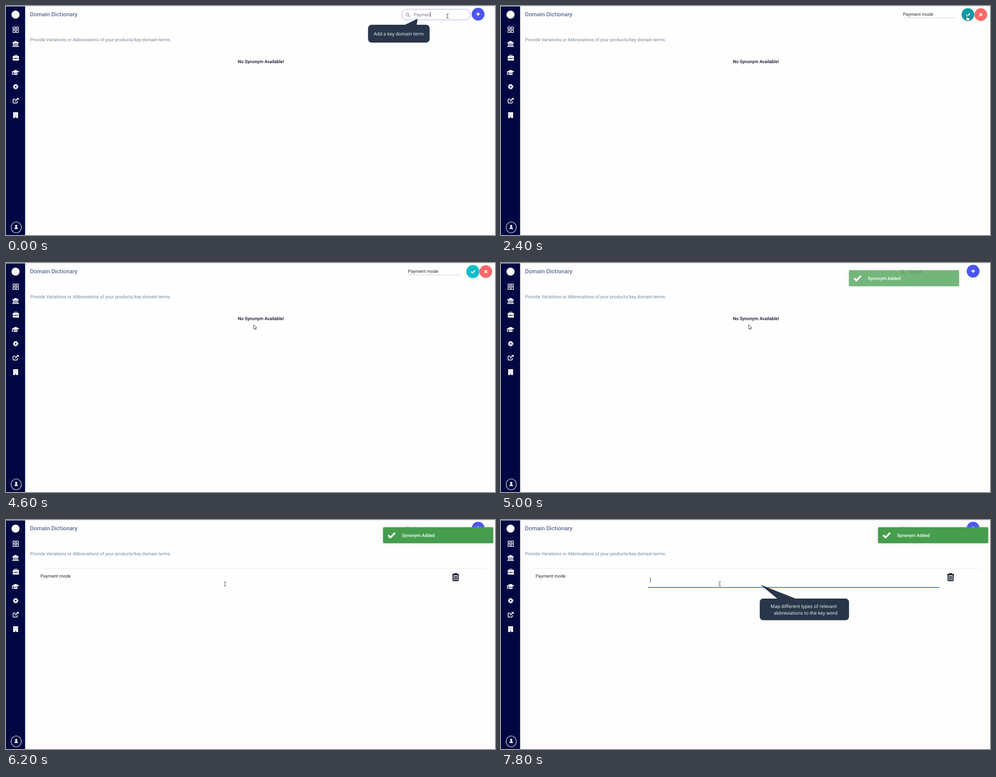
Animation, 1092 px wide and 513 px high, one loop 8000 ms. Source, as an HTML page:

```html
<!DOCTYPE html>
<html lang="en">
<head>
<meta charset="utf-8">
<title>Domain Dictionary</title>
<style>
  html, body { margin: 0; width: 100%; height: 100%; overflow: hidden; background: #fdfefd; }
  svg { display: block; width: 100%; height: 100%; }
  text { font: 10.05px Roboto, sans-serif; white-space: pre; text-rendering: geometricPrecision; }
  .title { font-size: 12.9px; font-weight: 500; fill: #5f6d92; }
  .hint { font-size: 10px; fill: #74869b; }
  .strong { font-weight: 500; }
  .dark { fill: #2b2e3a; }
  .grey { fill: #747a88; }
  .callout { fill: #29364a; }
  .callout text { font: 10.3px "Open Sans", sans-serif; fill: #fff; }
  .line { fill: none; stroke: #fff; }
  .toast { filter: drop-shadow(0 0 3px #9996); }
  .pointer { stroke: #2a2a2e; stroke-width: .9; fill: #fff; stroke-linejoin: round; }
  #confirm { paint-order: stroke; }
</style>
</head>
<body>
<svg viewBox="0 0 1092 513">
  <path d="M0 .5H1092" stroke="#e3e5ea"/>

  <!-- sidebar -->
  <rect y="1" width="42.7" height="512" fill="#010742"/>
  <g fill="#fff">
    <circle cx="21.3" cy="19.3" r="9"/>
    <path class="line" stroke-width="1.4" d="M15.7 47.2h4.8v4.8h-4.8zM22.9 47.2h4.8v4.8h-4.8zM15.7 54.4h4.8v4.8h-4.8zM22.9 54.4h4.8v4.8h-4.8z"/>
    <path d="M14 82.3L21.3 78l7.3 4.3v1.4H14zM14 89.5h14.8v1.9H14z"/>
    <path class="line" stroke-width="1.8" d="M16.8 84v5M19.8 84v5M22.8 84v5M25.8 84v5"/>
    <path d="M15 113q0-1 1-1h12q1 0 1 1v3.6H15zM15 117.6h5v1h3.6v-1H29v3.6q0 1-1 1H16q-1 0-1-1z"/>
    <path class="line" stroke-width="1.3" d="M19 112v-1.8h5.8v1.8"/>
    <path d="M13 147l8.5-4 8.5 4-8.5 3.7zM17 150v3.2q4.5 2.6 9 0V150l-4.5 2zM13.7 147.5h1.4l.6 6.5h-2.4z"/>
    <circle class="line" cx="21.6" cy="180.8" r="3.3" stroke-width="2.8"/>
    <circle class="line" cx="21.6" cy="180.8" r="5.2" stroke-width="1.8" stroke-dasharray="2.2 1.884"/>
    <path class="line" stroke-width="1.6" d="M25.2 213v3.2q0 1.2-1.2 1.2h-7q-1.2 0-1.2-1.2v-6.4q0-1.2 1.2-1.2h4.5"/>
    <path class="line" stroke-width="2" d="M20.4 213.2l5.4-5.2"/>
    <path d="M23.2 206h5.2v5.2z"/>
    <path d="M16 238h11v13H16z"/>
    <path d="M18.8 240v7M21.5 240v7M24.2 240v7" stroke="#010742" stroke-opacity=".5" stroke-dasharray="1 1.2"/>
    <path d="M20.5 248.5h2v2.5h-2z" fill="#010742"/>
    <ellipse class="line" cx="22.8" cy="496" rx="11.3" ry="12.3" stroke-width="1.1"/>
    <circle cx="22.8" cy="492.8" r="2.5"/>
    <path d="M18.9 499.6q0-4.2 3.9-4.2t3.9 4.2z"/>
  </g>

  <text class="title" x="53.5" y="23.3">Domain Dictionary</text>
  <text class="hint" x="54" y="79">Provide Variations or Abbrevations of your products/key domain terms.</text>
  <text id="empty" class="strong" x="517.8" y="128.2" fill="#0c1024">No Synonym Available!</text>

  <g id="list">
    <path d="M68 108.5H1070" stroke="#e8e9ec"/>
    <text class="dark" x="77" y="128.8">Payment mode</text>
    <g fill="none" stroke="#0d1126" stroke-width="2.2">
      <path d="M996.3 122.4h15.4M1001.2 122v-1.7h5.6v1.7M998.4 123v11.8q0 1.2 1.2 1.2h8.8q1.2 0 1.2-1.2V123"/>
      <path d="M1001.6 125v9.5M1004 125v9.5M1006.4 125v9.5" stroke-width="1.5"/>
    </g>
    <path id="underline" stroke="#2f96df" stroke-width="2"/>
    <path id="inputCaret" d="M333.7 128v12" stroke="#333"/>
  </g>

  <g id="search">
    <rect id="ring" x="884" y="7.3" width="153" height="23.6" rx="11.8" fill="#fff" stroke="#dddcfa" stroke-width="2.8"/>
    <circle cx="896.6" cy="19.2" r="3.2" fill="none" stroke="#a2a3ab" stroke-width="1.4"/>
    <path d="M899 21.6l3 3" stroke="#a2a3ab" stroke-width="1.7"/>
    <text id="query" class="grey" x="911" y="23"></text>
    <path id="queryCaret" d="M.5 13.5v11.5" stroke="#333"/>
    <circle cx="1054.3" cy="18.3" r="14.3" fill="#4c56f2"/>
    <path class="line" stroke-width="2.3" d="M1050.3 18.2h8M1054.3 14.2v8"/>
  </g>

  <g id="edit">
    <text class="dark" x="897.8" y="22">Payment mode</text>
    <path d="M898 26.5h116" stroke="#d0d1d5"/>
    <circle id="confirm" cx="1042.7" cy="19.3" r="14.2" stroke="#a9e9ee"/>
    <path class="line" stroke-width="2.2" d="M1038.8 19.4l2.9 2.9 5.6-5.8"/>
    <circle cx="1071.5" cy="19.3" r="14.2" fill="#fb6768"/>
    <path class="line" stroke-width="2.4" d="M1068.7 16.5l5.6 5.6M1074.3 16.5l-5.6 5.6"/>
  </g>

  <g id="termTip" class="callout">
    <path d="M889 43L919.3 28.5 917 43z"/>
    <rect x="808.5" y="42" width="137.5" height="40" rx="8"/>
    <text x="821.3" y="65.7">Add a key domain term</text>
  </g>
  <g id="mapTip" class="callout">
    <path d="M618 177L579.5 145 660 177z"/>
    <rect x="577.8" y="176" width="199.4" height="48.5" rx="8"/>
    <text x="676" y="197" text-anchor="middle">Map different types of relevant</text>
    <text x="680.3" y="211.6" text-anchor="middle">abbreviations to the key word</text>
  </g>

  <g id="toast" class="toast">
    <rect x="842" y="16.3" width="246" height="35.7" rx="2" fill="#459d4d"/>
    <path class="line" stroke-width="3.8" d="M853.6 34.2l5 5 10.4-10.6"/>
    <text class="strong" x="884.3" y="37.8" fill="#fff">Synonym Added</text>
  </g>

  <path id="beam" fill="none" stroke="#3c3c40" d="M-2.6-4.8q2.2 0 2.6.9q.4-.9 2.6-.9M-2.6 4.8q2.2 0 2.6-.9q.4.9 2.6.9M0-4V4"/>
  <path id="arrow" class="pointer" d="M0 0v10l2.4-2.1 1.6 3.4 1.6-.8-1.5-3.2h3z"/>
  <path id="hand" class="pointer" d="M-2.7 1V-5a1.2 1.2 0 0 1 2.4 0v3.6l3.8.8q1.4.4 1.3 1.8L4 5.6H-1.4L-5 1q.4-1.5 2.3 0z"/>
</svg>

<script>
const LOOP = 8000;
const pointers = ["beam", "arrow", "hand"];
const el = Object.fromEntries([...document.querySelectorAll("[id]")].map(node => [node.id, node]));

// Every step overrides part of the state before it.
const steps = [
  { at: 0, mode: "search", query: "Paymen", caret: true, ring: true, termTip: 1, mapTip: 0,
    pointer: ["beam", 986, 22.5], toast: [0, 0], list: false, hover: true, underline: 0, inputCaret: false },
  { at: 200, query: "Payment" },
  { at: 400, query: "Payment " },
  { at: 600, query: "Payment m" },
  { at: 800, query: "Payment mo" },
  { at: 1000, query: "Payment mode" },
  { at: 1400, caret: false, pointer: ["beam", 1005, 20] },
  { at: 1600, pointer: ["beam", 1024.7, 18] },
  { at: 1800, pointer: ["hand", 1050, 23], termTip: .5 },
  { at: 2000, pointer: ["hand", 1052, 25], termTip: 0 },
  { at: 2200, mode: "edit", pointer: ["hand", 1046, 26] },
  { at: 2400, pointer: ["hand", 1042, 27] },
  { at: 3200, pointer: ["hand", 1041, 27] },
  { at: 4000, hover: false, pointer: ["arrow", 985, 43] },
  { at: 4200, pointer: ["arrow", 810, 92] },
  { at: 4400, pointer: ["arrow", 625, 130] },
  { at: 4600, pointer: ["arrow", 553, 138] },
  { at: 4800, mode: "search", query: "Search", ring: false },
  { at: 5000, toast: [-65, .74] },
  { at: 5200, toast: [6, 1], list: true },
  { at: 5400, toast: [0, 1] },
  { at: 5800, pointer: ["beam", 540, 143.5] },
  { at: 6000, pointer: ["beam", 505, 143.5] },
  { at: 6200, pointer: ["beam", 489, 143.5] },
  { at: 6600, pointer: ["beam", 488.5, 143], underline: .6, inputCaret: true },
  { at: 6800, underline: 1 },
  { at: 7200, inputCaret: false },
  { at: 7600, inputCaret: true, mapTip: .5 },
  { at: 7800, mapTip: 1 },
];

const show = (node, visible) => { node.style.display = visible ? "" : "none"; };
const fade = (node, opacity) => { node.style.opacity = opacity; };
const move = (node, x, y) => node.setAttribute("transform", `translate(${x} ${y})`);

function render(time) {
  const state = Object.assign({}, ...steps.filter(step => step.at <= time));

  show(el.search, state.mode === "search");
  show(el.edit, state.mode === "edit");
  show(el.ring, state.ring);
  el.query.textContent = state.query;
  show(el.queryCaret, state.caret);
  if (state.caret) move(el.queryCaret, 911 + el.query.getComputedTextLength(), 0);

  el.confirm.setAttribute("fill", state.hover ? "#0f99a6" : "#0fbeca");
  el.confirm.setAttribute("stroke-width", state.hover ? 0 : 3);

  show(el.empty, !state.list);
  show(el.list, state.list);
  show(el.inputCaret, state.inputCaret);
  const half = 325.5 * state.underline;
  el.underline.setAttribute("d", `M${653.5 - half} 151H${653.5 + half}`);

  fade(el.termTip, state.termTip);
  fade(el.mapTip, state.mapTip);
  const [shift, opacity] = state.toast;
  move(el.toast, shift, 0);
  fade(el.toast, opacity);

  const [kind, x, y] = state.pointer;
  for (const name of pointers) show(el[name], name === kind);
  move(el[kind], x, y);
}

const start = performance.now();
function tick() {
  render((performance.now() - start) % LOOP);
  requestAnimationFrame(tick);
}
tick();
</script>
</body>
</html>
```
